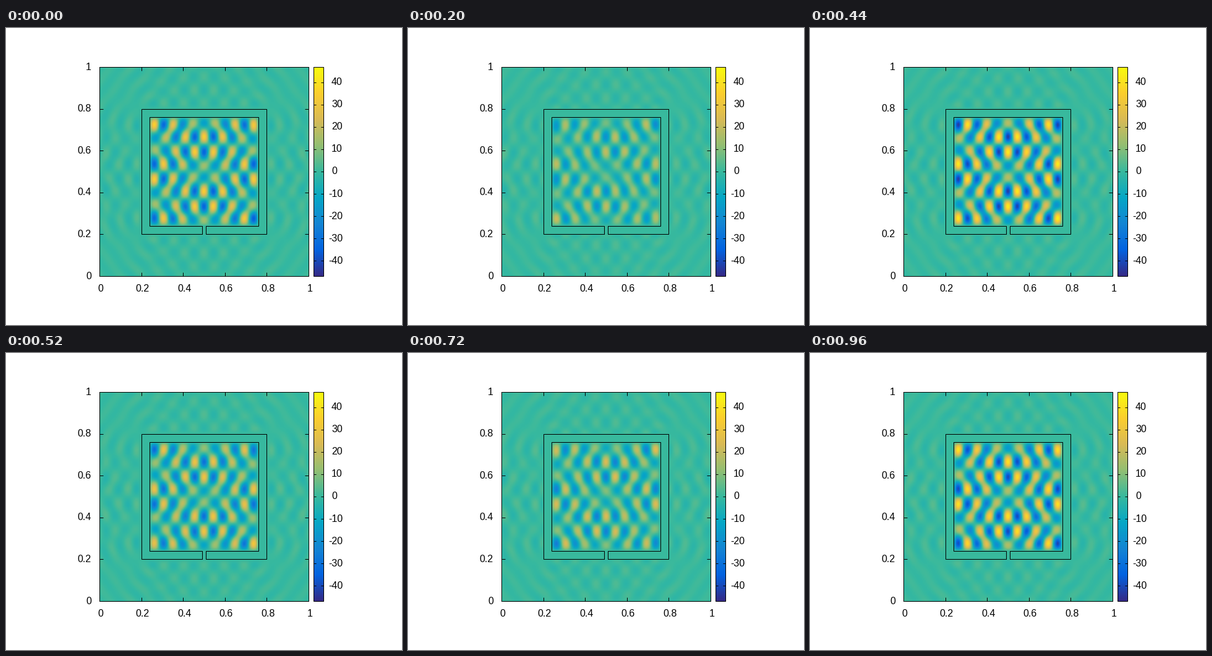
A matplotlib script for the animation above (1 s loop, 640x480 px).

```python
import numpy as np
import matplotlib.pyplot as plt
from matplotlib.animation import FuncAnimation
from matplotlib.colors import LinearSegmentedColormap

W, H, DPI = 640, 480, 100
FRAMES, INTERVAL = 25, 40
LEFT, TOP, SIDE = 151, 63, 338
CELLS = 169
VMAX = 46.8
PEAK = 0.882          # moment of the strongest cavity field, in loops
PX = 72 / DPI

palette = LinearSegmentedColormap.from_list("waves", [
    "#352a87", "#0363e1", "#1485d4", "#06a7c6", "#38b99e",
    "#92bf73", "#d9ba56", "#fcce2e", "#f9fb0e"], N=512)


def px(x):
    return LEFT + x * SIDE


def py(y):
    return TOP + (1 - y) * SIDE


def mode(m, n, u, v):
    return np.sin(m * np.pi * u) * np.sin(n * np.pi * v)


def cavity(u, v):
    """Two degenerate standing modes plus weak ones in quadrature."""
    main = 32 * (mode(11, 8, u, v) + 0.6 * mode(13, 4, u, v))
    weak = 1.6 * (mode(10, 9, u, v) + mode(8, 11, u, v))
    return (main + 1j * weak) * np.exp(2j * np.pi * PEAK)


def radiation(x, y):
    """Outgoing waves leaking through the four walls (y runs downward)."""
    k = np.pi * np.sqrt(185) / 0.52
    total = np.zeros(x.shape, complex)
    for s in (np.arange(96) + 0.5) / 96:
        along = 0.24 + 0.52 * s
        flat = 12 * np.sin(11 * np.pi * s) + 3.6 * np.sin(13 * np.pi * s)
        steep = 11 * np.sin(8 * np.pi * s) + 7.8 * np.sin(4 * np.pi * s)
        for sx, sy, nx, ny, strength in (
                (along, 0.2, 0, -1, flat), (along, 0.8, 0, 1, -flat),
                (0.2, along, -1, 0, steep), (0.8, along, 1, 0, steep)):
            dx, dy = x - sx, y - sy
            r = np.maximum(np.hypot(dx, dy), 0.006)
            facing = np.maximum(dx * nx + dy * ny, 0) / r
            total += strength * facing * np.exp(1j * k * r) / np.sqrt(r)
    return total


def build_field():
    c = (np.arange(CELLS) + 0.5) / CELLS
    x, y = np.meshgrid(c, c)
    reach = np.maximum(abs(x - 0.5), abs(y - 0.5))
    inside, outside = reach < 0.26, reach > 0.3
    field = np.zeros(x.shape, complex)
    field[inside] = cavity((x[inside] - 0.24) / 0.52, (y[inside] - 0.24) / 0.52)
    leak = radiation(x[outside], y[outside])
    leak *= 1.9 / np.sqrt(np.mean(abs(leak) ** 2))
    crest = np.argmin(np.hypot(x[outside] - 0.5, y[outside] - 0.045))
    field[outside] = leak * np.exp(-1j * np.angle(leak[crest]))
    return field


field = build_field()

fig = plt.figure(figsize=(W / DPI, H / DPI), dpi=DPI, facecolor="white")
ax = fig.add_axes([0, 0, 1, 1])
ax.axis("off")


def line(xs, ys):
    ax.plot(xs, ys, color="black", lw=PX, solid_capstyle="butt",
            solid_joinstyle="miter", zorder=3)


def label(x, y, text, ha):
    ax.text(x, y, text, ha=ha, va="baseline", family="Liberation Sans",
            fontsize=16 * PX, color="black")


def frame(x0, y0, x1, y1):
    line([x0, x1, x1, x0, x0], [y0, y0, y1, y1, y0])


image = ax.imshow(field.real, cmap=palette, vmin=-VMAX, vmax=VMAX,
                  extent=(LEFT, LEFT + SIDE, TOP + SIDE, TOP),
                  interpolation="nearest", aspect="auto")

# plot border, ticks and numbers
right, bottom = LEFT + SIDE, TOP + SIDE
frame(LEFT, TOP, right, bottom)
for i in range(6):
    value = i / 5
    x, y = px(value), py(value)
    line([x, x], [bottom, bottom - 6])
    line([x, x], [TOP, TOP + 6])
    line([LEFT, LEFT + 6], [y, y])
    line([right, right - 6], [y, y])
    label(x + 2, 426, f"{value:g}", "center")
    label(138, y + 4.5, f"{value:g}", "right")

# walls with the narrow slit at the bottom
wall = [(0.49, 0.2), (0.2, 0.2), (0.2, 0.8), (0.8, 0.8), (0.8, 0.2), (0.51, 0.2),
        (0.51, 0.24), (0.76, 0.24), (0.76, 0.76), (0.24, 0.76), (0.24, 0.24),
        (0.49, 0.24), (0.49, 0.2)]
line([px(x) for x, _ in wall], [py(y) for _, y in wall])

# colour scale
BAR0, BAR1 = 497, 513
ax.imshow(np.linspace(1, 0, SIDE)[:, None], cmap=palette, vmin=0, vmax=1,
          extent=(BAR0, BAR1, bottom, TOP), interpolation="nearest", aspect="auto")
frame(BAR0, TOP, BAR1, bottom)
for value in range(-40, 41, 10):
    y = py(0.5 + value / (2 * VMAX))
    line([BAR0, BAR0 + 4], [y, y])
    line([BAR1, BAR1 - 4], [y, y])
    label(521.5 if value < 0 else 526, y + 4.5, str(value), "left")

ax.set_xlim(0, W)
ax.set_ylim(H, 0)


def update(i):
    image.set_data((field * np.exp(-2j * np.pi * i / FRAMES)).real)
    return [image]


anim = FuncAnimation(fig, update, frames=FRAMES, interval=INTERVAL,
                     repeat=True, repeat_delay=0, blit=False)
plt.show()
```
